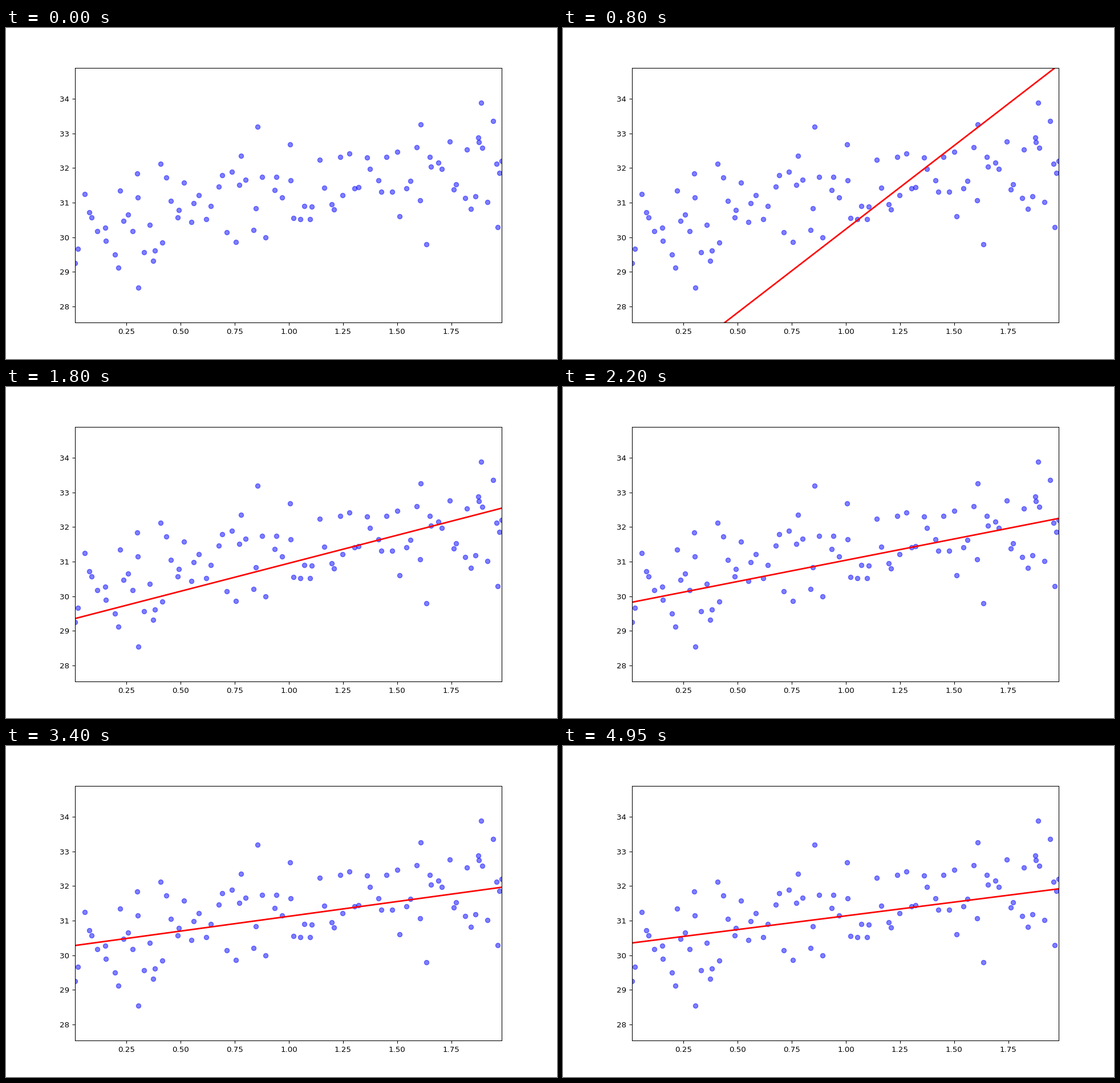
Write a matplotlib script that moves like this. It is 966 px wide and 580 px high and loops after 5 s.

```python
import numpy as np
import matplotlib.pyplot as plt
from matplotlib.animation import FuncAnimation

DPI = 96.6
FIG_SIZE = (10, 6.00415)  # 966 x 580 px
FRAMES, INTERVAL = 100, 50
RATE, STEPS_PER_FRAME = 0.1, 5
SAMPLES = 100
X_LIM = np.array([0.0108, 1.9842])
Y_LIM = (27.526, 34.907)

FIT = np.array([30.3515, 0.789])  # least-squares intercept and slope
X_MEAN, X_SQUARE_MEAN = 1.032, 1.420

# The samples that stand out from the cloud.
OUTLIERS = [
    (0.011, 29.25), (0.213, 29.12), (0.304, 28.53), (0.373, 29.32),
    (0.299, 31.85), (0.408, 32.12), (0.778, 32.35), (0.854, 33.19),
    (1.004, 32.68), (1.610, 33.27), (1.634, 29.80), (1.822, 32.54),
    (1.875, 32.89), (1.888, 33.90), (1.944, 33.37), (1.965, 30.29),
    (1.984, 32.20),
]


def predict(theta, x):
    return theta[0] + theta[1] * x


def make_samples():
    """An even cloud around the fitted line, plus the outliers."""
    rng = np.random.default_rng(7)
    count = SAMPLES - len(OUTLIERS)
    x = np.interp((np.arange(count) + rng.random(count)) / count, [0, 1], X_LIM)
    y = predict(FIT, x) + rng.uniform(-1.1, 1.1, count)
    return np.vstack([np.column_stack([x, y]), OUTLIERS]).T


def descend(steps):
    """Parameters after some gradient descent steps from zero."""
    hessian = np.array([[1, X_MEAN], [X_MEAN, X_SQUARE_MEAN]])
    shrink = np.linalg.matrix_power(np.eye(2) - RATE * hessian, steps)
    return FIT - shrink @ FIT


fig, ax = plt.subplots(figsize=FIG_SIZE, dpi=DPI)
ax.set_xlim(*X_LIM)
ax.set_ylim(*Y_LIM)
ax.plot(*make_samples(), "bo", alpha=0.5)
line, = ax.plot([], [], "r-", lw=2)


def update(frame):
    theta = descend(frame * STEPS_PER_FRAME + 1)
    line.set_data(X_LIM, predict(theta, X_LIM))
    return line,


anim = FuncAnimation(fig, update, frames=FRAMES, interval=INTERVAL,
                     repeat=True, repeat_delay=0)
plt.show()
```
